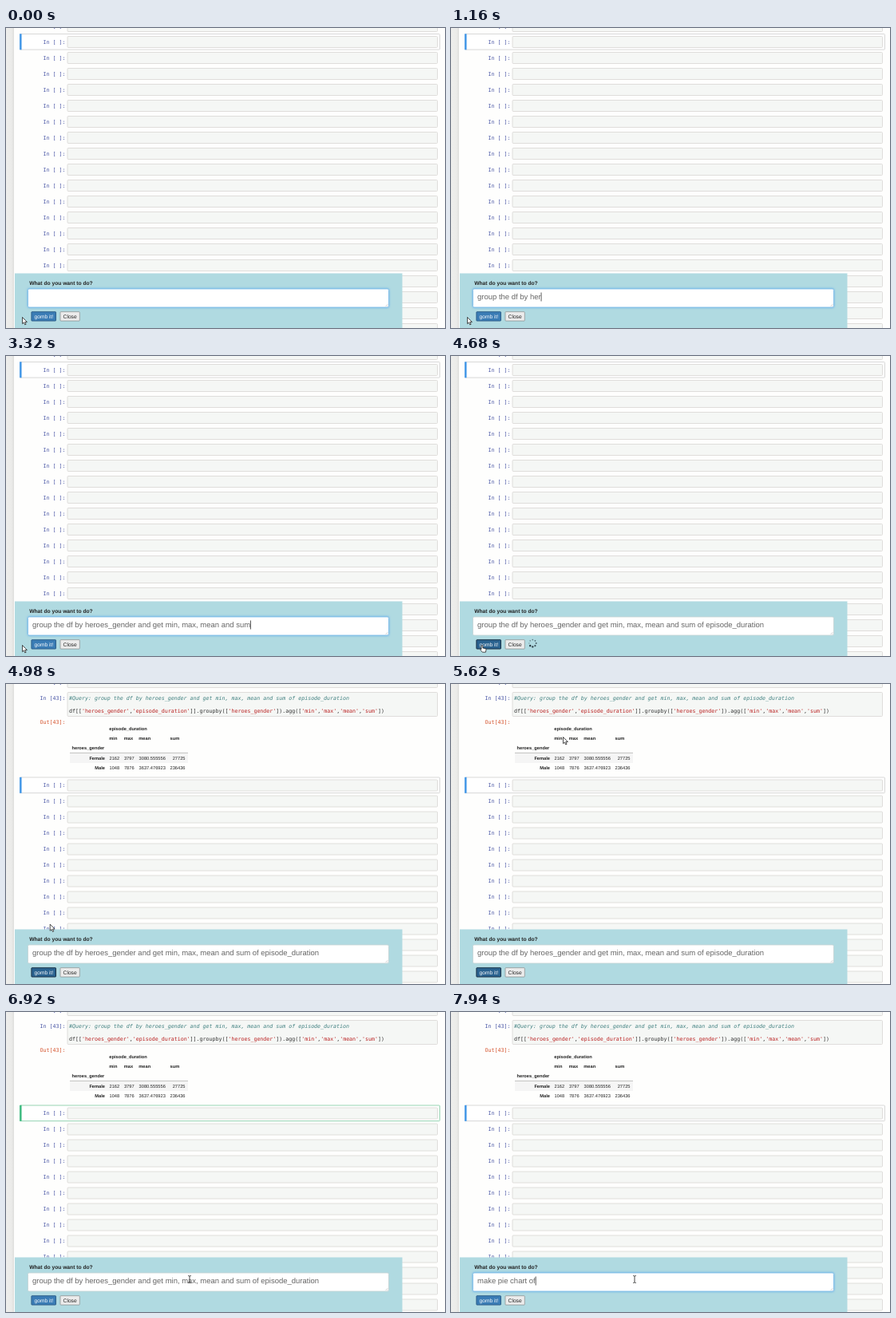
These frames come from a looping animation (550x376 px, 8000 ms). An HTML page:

```html
<!DOCTYPE html>
<html lang="en">
<head>
<meta charset="utf-8">
<title>Notebook query</title>
<style>
html, body { margin: 0; height: 100%; overflow: hidden; background: #fefefd; }
svg { display: block; width: 550px; height: 376px; }
text { font-family: "Liberation Sans", Arial, sans-serif; white-space: pre; text-rendering: geometricPrecision; }
.code text { font: 6.645px "DejaVu Sans Mono", monospace; fill: #333; }
.code .in { fill: #4a57a6; text-anchor: end; }
.code .out { fill: #d5552f; text-anchor: end; }
.code .note { fill: #408080; font-style: italic; }
.str { fill: #ba2121; }
.table text { font-size: 5.7px; fill: #222; }
.table .b, .label { font-weight: bold; }
.r { text-anchor: end; }
.ui { font-size: 6.67px; }
</style>
</head>
<body>
<svg viewBox="0 0 550 376">
  <defs>
    <linearGradient id="edge"><stop offset="0" stop-color="#eeeeec"/><stop offset=".7" stop-color="#ebebe9"/><stop offset="1" stop-color="#dededc"/></linearGradient>
    <filter id="blur" x="-5%" y="-40%" width="110%" height="180%"><feGaussianBlur stdDeviation="1.5"/></filter>
  </defs>
  <rect width="10" height="376" fill="url(#edge)"/>
  <g id="frame">
    <rect x="17.5" y="-10" width="526" height="19.6" rx="1" fill="#fff" stroke-width=".8"/>
    <rect id="bar" x="17" y="-10.2" width="2.6" height="20"/>
  </g>
  <g id="before" class="code"></g>
  <g id="after">
    <g id="cells" class="code"></g>
    <g id="table" class="table"></g>
  </g>
  <rect x="11" y="307.5" width="485.5" height="69" fill="#b0dae1"/>
  <text class="label" x="29.2" y="322" font-size="6.69" fill="#222">What do you want to do?</text>
  <rect id="glow" x="27" y="326.5" width="453" height="24" rx="2" fill="#66afe9" filter="url(#blur)"/>
  <rect id="area" x="27.5" y="327" width="452" height="23" rx="1.5" fill="#fff" stroke-width=".8"/>
  <path d="M475.5 349l3-3M477.5 349l1-1" stroke="#aaa" stroke-width=".5"/>
  <rect id="sel" x="33" y="331" width="359.5" height="11.5" fill="#3390ff"/>
  <text id="query" x="33" y="340.2" font-size="9.49"></text>
  <rect id="caret" y="331.5" width=".8" height="11" fill="#333"/>
  <rect id="go" x="31.9" y="355.7" width="30.6" height="11.4" rx=".6" stroke-width=".9"/>
  <text class="ui" x="35.6" y="363.8" fill="#fff">gomb it!</text>
  <rect x="68" y="355.7" width="24.3" height="11.4" rx=".8" fill="#ececec" stroke="#888" stroke-width=".7"/>
  <text class="ui" x="71.6" y="363.8" fill="#222">Close</text>
  <g id="spin" fill="#26353d"></g>
  <g id="mouse">
    <path id="arrow" d="M0 0V8.2L1.9 6.5L3.2 9.4L4.6 8.8L3.3 6H5.9Z" fill="#fff" stroke="#222" stroke-width=".8"/>
    <path id="hand" d="M-1 0Q0-1 .9 0V3L4.2 3.7Q5.2 4 5 5.2L4.4 8.2H.3L-2.4 5Q-2.2 4-1 4.5Z" fill="#fff" stroke="#222" stroke-width=".8"/>
    <path id="beam" d="M-1.8-4.5Q0-4.5 0-3.5Q0-4.5 1.8-4.5M0-3.5V3.5M-1.8 4.5Q0 4.5 0 3.5Q0 4.5 1.8 4.5" fill="none" stroke="#333" stroke-width=".9"/>
  </g>
</svg>
<script>
const LOOP = 8000, CLICK = 4600, RESULT = 4700, EDIT = 6440, FOCUS = 6960, SELECT = 7100, RETYPE = 7360;
const $ = id => document.getElementById(id);
const show = (id, on) => $(id).style.display = on ? "" : "none";
const set = (id, attrs) => { for (const k in attrs) $(id).setAttribute(k, attrs[k]); };
const text = (x, y, s, cls = "") => `<text x="${x}" y="${y}" class="${cls}">${s}</text>`;
const box = (y, h) => `<rect x="77" y="${y}" width="463.5" height="${h}" rx="1" fill="#f5f7f5" stroke="#d9d6d4" stroke-width=".8"/>`;
const cell = y => box(y - 7, 14) + text(74.5, y + 2.2, "In [ ]:", "in");
const cells = y => { let s = cell(-2.5); for (; y < 390; y += 20) s += cell(y); return s; };

// [first key, last key, typed text]
const first = [
  [100, 860, "group the df b"], [920, 1700, "y heroes_gender a"],
  [1740, 2260, "nd get min"], [2320, 2520, ", max"],
  [2640, 3300, ", mean and sum"], [3345, 3440, " of "],
  [3540, 4340, "episode_duration"]];
const second = [[RETYPE, 7940, "make pie chart of"]];
const typed = (keys, t) => keys.map(([a, b, s]) =>
  t < a ? "" : s.slice(0, Math.floor((t - a) / (b - a) * (s.length - 1) + 1e-6) + 1)).join("");

const code = "df[['heroes_gender','episode_duration']].groupby(['heroes_gender']).agg(['min','max','mean','sum'])"
  .replace(/'\w+'/g, s => `<tspan class="str">${s}</tspan>`);
$("before").innerHTML = cells(17.5);
$("cells").innerHTML = cells(127) + box(10.5, 30) +
  text(74.5, 19.7, "In [43]:", "in") + text(74.5, 49.7, "Out[43]:", "out") +
  text(79, 19.7, "#Query: " + typed(first, LOOP), "note") + text(79, 35.7, code);

const row = (id, y, fill, name, values) =>
  `<rect id="${id}" x="80" y="${y}" width="148" height="12.4" fill="${fill}"/>` +
  text(124, y + 8.4, name, "b r") +
  values.map((v, i) => text([142.2, 160.6, 199.8, 224.5][i], y + 8.4, v, "r")).join("");
$("table").innerHTML = text(129.3, 57.5, "episode_duration", "b") +
  ["min", "max", "mean", "sum"].map((s, i) => text([129.3, 147.8, 166.3, 205.6][i], 70, s, "b")).join("") +
  text(82.5, 82, "heroes_gender", "b") +
  row("female", 86.6, "#f5f5f5", "Female", ["2162", "3797", "3080.555556", "27725"]) +
  row("male", 99, "#fefefd", "Male", ["1048", "7876", "3637.476923", "236436"]) +
  `<path d="M80 86.4H228" stroke="#999" stroke-width=".6"/>`;

for (let i = 0; i < 8; i++)
  $("spin").innerHTML += `<circle cy="-4.4" r="${.7 + i * .08}" opacity="${.4 + i * .085}" transform="rotate(${i * 45})"/>`;

// [time, x, y]
const path = [[4460, 20.5, 362.5], [4580, 39, 363], [4880, 39, 363], [5260, 100, 130], [5460, 147, 31],
  [5620, 140.5, 66.5], [5700, 140.5, 66.5], [5860, 178, 90], [6040, 223, 101.5], [6220, 223, 101.5],
  [6400, 230, 127], [6460, 230, 127], [6880, 230, 335]];
function mouseAt(t) {
  const i = path.findIndex(p => p[0] > t);
  if (i == 0) return path[0].slice(1);
  if (i < 0) return path[path.length - 1].slice(1);
  const [a, ax, ay] = path[i - 1], [b, bx, by] = path[i];
  const u = (t - a) / (b - a);
  return [ax + (bx - ax) * u, ay + (by - ay) * u];
}

function draw(t) {
  const done = t >= RESULT, focused = t < CLICK || t >= FOCUS;
  const editing = t >= EDIT && t < FOCUS, selected = t >= SELECT && t < RETYPE;
  show("before", !done);
  show("after", done);
  set("frame", { transform: `translate(0 ${done ? 127 : 17.5})` });
  $("frame").firstElementChild.setAttribute("stroke", editing ? "#7cc9a0" : "#cfcfcf");
  set("bar", { fill: editing ? "#45bd85" : "#4a9be8" });

  $("query").textContent = typed(t < RETYPE ? first : second, t);
  set("query", { fill: selected ? "#fff" : "#666" });
  show("sel", selected);
  show("glow", focused);
  set("area", { stroke: focused ? "#7dbbe8" : "#c4d2d4" });
  const caretOff = t < 100 || (t >= 2260 && t < 2300);
  show("caret", focused && !selected && !caretOff);
  set("caret", { x: 33 + $("query").getComputedTextLength() });

  const [x, y] = mouseAt(t);
  const onButton = x > 31 && x < 63 && y > 355;
  const dark = onButton || (t >= CLICK && t < EDIT);
  set("go", { fill: dark ? "#2a628f" : "#3a7cb5", stroke: dark ? "#14283a" : "#2b5a85" });
  show("spin", t >= CLICK && !done);
  set("spin", { transform: `translate(102.3 360) rotate(${Math.floor(t / 60) * 45})` });

  const inRow = top => x > 80 && x < 228 && y >= top && y < top + 12.4;
  set("female", { fill: inRow(86.6) ? "#d9edfb" : "#f5f5f5" });
  set("male", { fill: inRow(99) ? "#d9edfb" : "#fefefd" });
  const beam = t > 6220 && (y > 327 || (y > 119 && y < 307));
  set("mouse", { transform: `translate(${x} ${y})` });
  show("hand", onButton);
  show("beam", beam);
  show("arrow", !onButton && !beam);
}

const start = performance.now();
function tick() {
  draw((performance.now() - start) % LOOP);
  requestAnimationFrame(tick);
}
tick();
</script>
</body>
</html>
```
